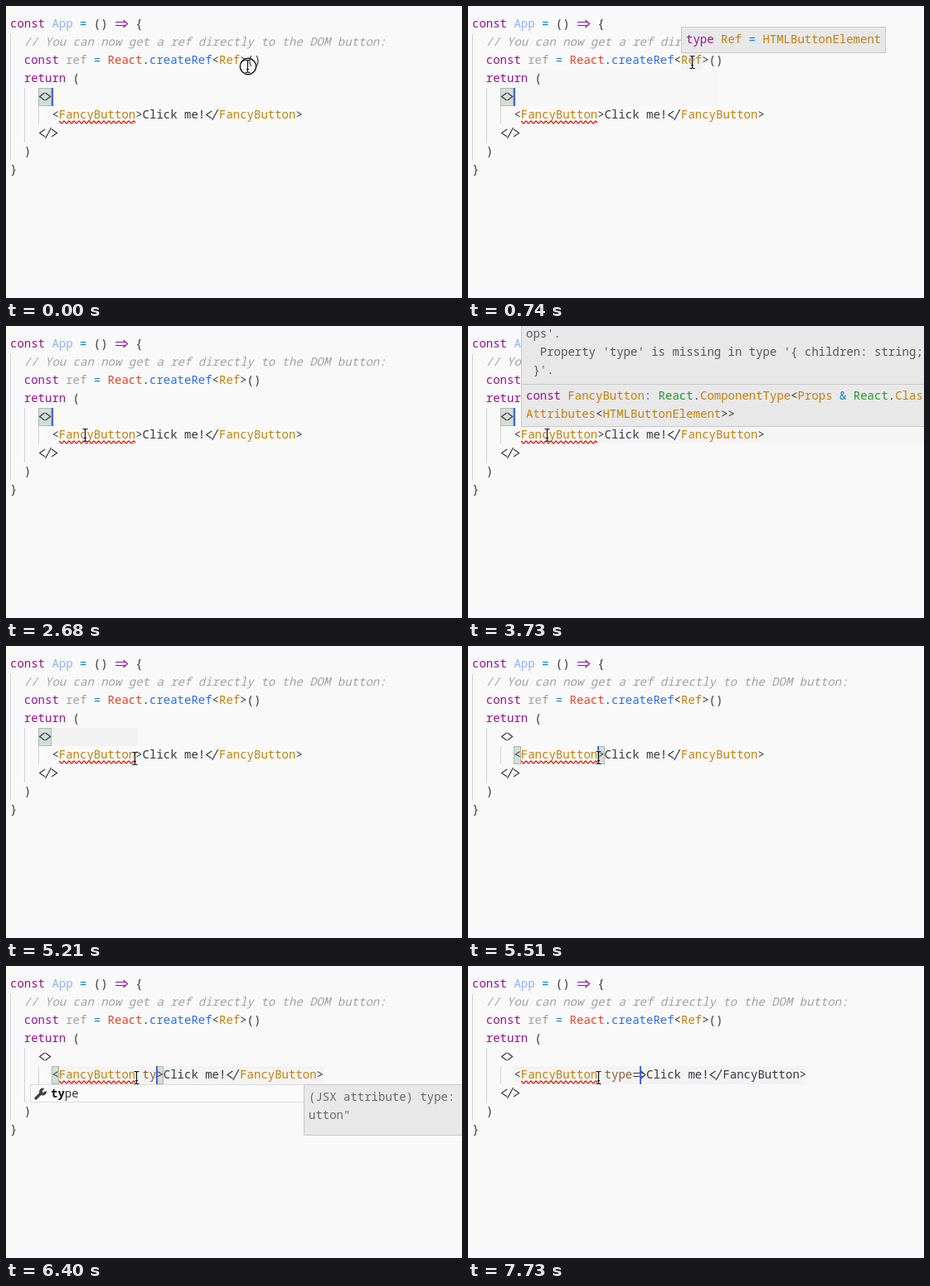
An HTML page with a canvas that plays this animation: 550x353 px, repeating every 8000 ms.

```html
<!DOCTYPE html>
<html lang="en">
<head>
<meta charset="utf-8">
<title>Typed ref editor</title>
<style>
html, body { margin: 0; width: 100%; height: 100%; overflow: hidden; background: #f9f9f9; }
canvas { display: block; width: 550px; height: 353px; }
</style>
</head>
<body>
<canvas id="stage" width="550" height="353"></canvas>
<script>
(() => {
const ctx = document.getElementById('stage').getContext('2d');
const LOOP = 8000, CW = 8.4, LEFT = 5, ROW = 22;
const FONT = '14px "Noto Sans Mono", "DejaVu Sans Mono", monospace';
const C = {
  bg: '#f9f9f9', fg: '#34373d', purple: '#950f96', pale: '#8db4f3', op: '#1183c4',
  grey: '#a0a1a5', red: '#e2452f', blue: '#2c6fe8', gold: '#c28108', green: '#259a2c',
  attr: '#835f37', msg: '#55575b', caret: '#4164e6', panel: '#e8e8e8', edge: '#c8c8c8'
};

// Pointer positions: time, x, y
const POINTER = [
  [0, 291, 73], [150, 282, 70], [290, 270, 68],
  [1930, 263, 80], [2080, 235, 100], [2230, 180, 120], [2380, 135, 130], [2530, 105, 133], [2680, 95, 132],
  [4480, 118, 136], [4630, 155, 143], [4780, 185, 148], [4930, 192, 150], [5060, 175, 143],
  [5210, 155, 136], [5360, 157, 135]
];
const BLINKS = [150, 590, 1190, 1630, 2080, 2680, 3130, 3730, 4180, 4630, 5060];
const CLICK = 5360, ACCEPT = 7300, EQUALS = 7580, REPARSE = 7730;

const col = n => LEFT + n * CW;
const rowY = r => 11 + r * ROW;
const within = (t, a, b) => t >= a && t < b;

function rect(x, y, w, h, fill, edge) {
  ctx.fillStyle = fill;
  ctx.fillRect(x, y, w, h);
  if (!edge) return;
  ctx.strokeStyle = edge;
  ctx.lineWidth = 1;
  ctx.strokeRect(x + .5, y + .5, w - 1, h - 1);
}

function line(color, width, ...paths) {
  ctx.strokeStyle = color;
  ctx.lineWidth = width;
  ctx.beginPath();
  for (const p of paths)
    for (let i = 0; i < p.length; i += 2)
      i ? ctx.lineTo(p[i], p[i + 1]) : ctx.moveTo(p[i], p[i + 1]);
  ctx.stroke();
}

// Joined glyphs, drawn around the cell start x and row middle y
const LIGATURES = {
  '<>': (x, y) => [[x + 8, y - 4.5, x + 2, y, x + 8, y + 4.5], [x + 9, y - 4.5, x + 15, y, x + 9, y + 4.5]],
  '</': (x, y) => [[x + 8, y - 4.5, x + 1.5, y, x + 8, y + 4.5], [x + 15.5, y - 6.5, x + 8.5, y + 6.5]],
  '</>': (x, y) => [[x + 8.5, y - 4.5, x + 2, y, x + 8.5, y + 4.5], [x + 16, y - 6.5, x + 9, y + 6.5],
    [x + 16.5, y - 4.5, x + 23, y, x + 16.5, y + 4.5]],
  '=>': (x, y) => [[x + 1, y - 2, x + 13, y - 2], [x + 1, y + 2, x + 13, y + 2],
    [x + 10.5, y - 4.5, x + 15.5, y, x + 10.5, y + 4.5]]
};

// Writes alternating text and colour, returns the end x
function write(x, mid, ...parts) {
  for (let i = 0; i < parts.length; i += 2) {
    const s = parts[i], color = parts[i + 1];
    const lig = LIGATURES[s];
    if (lig) line(color, 1.2, ...lig(x, mid + .5));
    else {
      ctx.fillStyle = color;
      ctx.fillText(s, x, mid + 5);
    }
    x += s.length * CW;
  }
  return x;
}
const code = (row, indent, ...parts) => write(col(indent), 21 + row * ROW, ...parts);

function bracket(c, row, cells = 1) {
  const x = Math.round(col(c));
  rect(x, rowY(row), Math.round(col(c + cells)) - x, ROW, '#d5ddd7', '#adb6af');
}

function guides() {
  for (const [c, a, b] of [[0, 1, 8], [2, 4, 7], [4, 5, 6]])
    rect(Math.round(col(c)), rowY(a), 1, rowY(b) - rowY(a), '#d3d3d3');
}

function squiggle() {
  const p = [];
  for (let x = 64; x <= 156; x++) p.push(x, 140.5 - 1.4 * Math.cos((x - 64) * Math.PI / 3));
  line('#e5140f', 1.2, p);
}

function typedText(t) {
  if (t >= EQUALS) return ' type=';
  if (t >= ACCEPT) return ' type';
  return ' ty'.slice(0, [5660, 5810, 5960].filter(k => t >= k).length);
}

function listing(t, typed) {
  code(0, 0, 'const', C.purple, ' App', C.pale, ' =', C.op, ' () ', C.fg, '=>', C.purple, ' {', C.fg);
  ctx.font = 'italic ' + FONT;
  code(1, 2, '// You can now get a ref directly to the DOM button:', C.grey);
  ctx.font = FONT;
  code(2, 2, 'const', C.purple, ' ref', C.grey, ' =', C.op, ' React', C.red, '.', C.fg,
    'createRef', C.blue, '<', C.fg, 'Ref', C.gold, '>()', C.fg);
  code(3, 2, 'return', C.purple, ' (', C.fg);
  code(4, 4, '<>', C.fg);
  const hasEq = typed.endsWith('=');
  code(5, 6, '<', C.fg, 'FancyButton', C.gold, hasEq ? typed.slice(0, -1) : typed, C.attr,
    hasEq ? '=>' : '>', C.fg, 'Click me!', C.fg, '</', C.fg,
    'FancyButton', t >= REPARSE ? C.fg : C.gold, '>', C.fg);
  code(6, 4, '</>', C.fg);
  code(7, 2, ')', C.fg);
  code(8, 0, '}', C.fg);
}

function typeHint() {
  rect(257, 25, 247, 32, C.panel, C.edge);
  write(263, 40, 'type', C.purple, ' Ref', C.gold, ' =', C.op, ' HTMLButtonElement', C.gold);
}

function errorHint() {
  rect(64, -40, 520, 162, C.panel, C.edge);
  rect(65, 70, 485, 1, C.edge);
  write(70, 9, "ops'.", C.msg);
  write(70, 31, "  Property 'type' is missing in type '{ children: string;", C.msg);
  write(70, 53, " }'.", C.msg);
  write(70, 84, 'const', C.purple, ' FancyButton', C.gold, ':', C.op, ' React', C.green, '.', C.fg,
    'ComponentType', C.gold, '<', C.fg, 'Props', C.gold, ' &', C.op, ' React', C.green, '.', C.fg, 'Class', C.gold);
  write(70, 106, 'Attributes', C.gold, '<', C.fg, 'HTMLButtonElement', C.gold, '>>', C.fg);
}

function wrench(x, y) {
  ctx.lineCap = 'round';
  line('#424242', 3.4, [x - 5, y + 5, x + 2, y - 2]);
  ctx.lineCap = 'butt';
  ctx.lineWidth = 3;
  ctx.beginPath();
  ctx.arc(x + 3.5, y - 3, 3, -.1, Math.PI * 1.6);
  ctx.stroke();
}

function suggestions() {
  rect(29, 143, 331, 22, '#fbfbfb', '#dcdcdc');
  wrench(41, 155);
  ctx.font = 'bold ' + FONT;
  const x = write(54, 154, 'ty', '#111');
  ctx.font = FONT;
  write(x, 154, 'pe', C.fg);
  rect(359, 143, 200, 62, C.panel, C.edge);
  write(365, 158, '(JSX attribute) type:', '#66686b');
  write(365, 180, 'utton"', '#66686b');
}

function pointer(t) {
  const [, x, y] = POINTER.filter(p => t >= p[0]).pop();
  if (t < 150 || within(t, CLICK, 5510)) {
    ctx.strokeStyle = '#111';
    ctx.lineWidth = 1.4;
    ctx.beginPath();
    ctx.arc(x + 1, y, 9.7, 0, 7);
    ctx.stroke();
  }
  const cx = x + .5;
  const beam = [
    [cx - 3, y - 7.5, cx - 1, y - 7.5, cx, y - 6.5, cx + 1, y - 7.5, cx + 3, y - 7.5],
    [cx, y - 6.5, cx, y + 6.5],
    [cx - 3, y + 7.5, cx - 1, y + 7.5, cx, y + 6.5, cx + 1, y + 7.5, cx + 3, y + 7.5],
    [cx - 1.5, y + 3.5, cx + 1.5, y + 3.5]
  ];
  line('rgba(255,255,255,.7)', 2.4, ...beam);
  line('#111', 1.2, ...beam);
}

function hint(t, from, to, paint) {
  if (!within(t, from, to)) return;
  ctx.globalAlpha = t < from + 150 ? .5 : 1;
  paint();
  ctx.globalAlpha = 1;
}

function draw(t) {
  const typed = typedText(t), end = 18 + typed.length, clicked = t >= CLICK;
  rect(0, 0, 550, 353, C.bg);
  ctx.font = FONT;

  if (within(t, 290, 2230)) rect(57, 77, 245, 44, '#f7f7f7');
  if (within(t, 4780, CLICK)) rect(55, 99, 104, 22, '#f2f2f2');
  if (typed) rect(55, 121, Math.round(col(end + 24)) - 55, 22, '#f3f3f3');
  if (within(t, 590, 2230)) rect(257, 55, 26, 22, '#eef4fa');
  if (within(t, 2980, 4780)) rect(64, 121, 486, 21, '#f5f5f5');

  guides();
  if (!clicked) bracket(4, 4, 2);
  else if (t < EQUALS) {
    bracket(6, 5);
    bracket(end, 5);
  }
  listing(t, typed);
  squiggle();

  if (!clicked) {
    if (BLINKS.filter(b => t >= b).length % 2 === 0) rect(55, 99, 2, 22, C.caret);
  } else if (!within(t, 6700, 7150)) {
    rect(Math.round(col(end)), 121, 2, 22, C.caret);
  }

  hint(t, 590, 2230, typeHint);
  hint(t, 2980, 4780, errorHint);
  if (within(t, 6400, ACCEPT)) suggestions();
  pointer(t);
}

const start = performance.now();
function tick() {
  draw((performance.now() - start) % LOOP);
  requestAnimationFrame(tick);
}
tick();
})();
</script>
</body>
</html>
```
